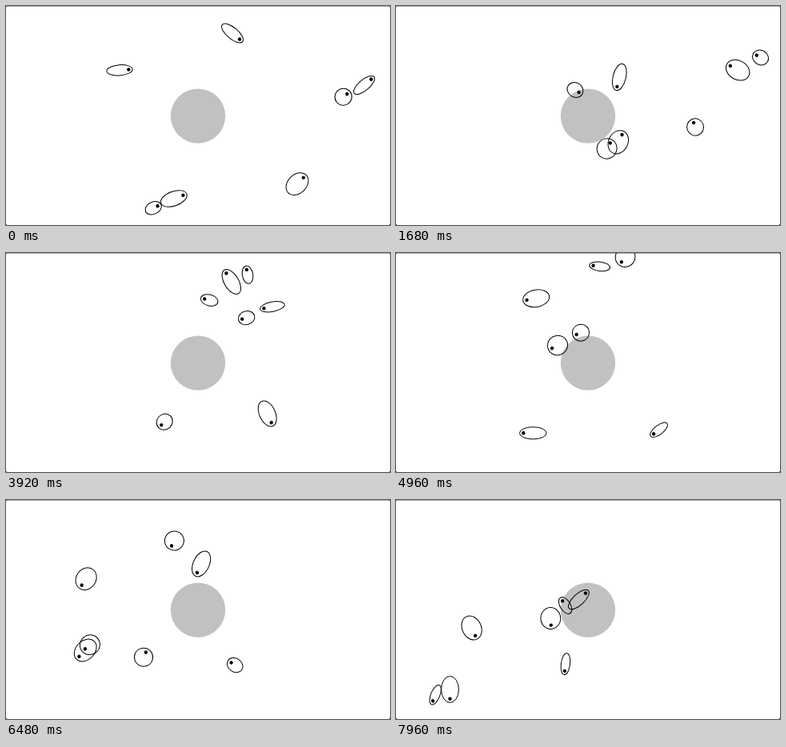
Recreate the animation shown at these times as an HTML page. Size 480 px wide and 274 px high, loop 8 s.

```html
<!DOCTYPE html>
<html lang="en">
<head>
<meta charset="utf-8">
<title>Swimmers</title>
<style>
  html, body { margin: 0; width: 100%; height: 100%; overflow: hidden; background: #fff; }
  svg { display: block; width: 100%; height: 100%; }
</style>
</head>
<body>
<svg id="stage" viewBox="0 0 480 274">
  <path d="M0 .5H480" stroke="#a8a8a8"/>
  <path d="M0 0h1v1h-1zM479 0h1v1h-1zM0 273h1v1h-1zM479 273h1v1h-1z" fill="#444"/>
  <circle cx="240" cy="137.6" r="34.2" fill="#c1c1c1"/>
</svg>
<script>
const LOOP = 8000, STEP = 40;
const TIMES = [0, 1.68, 2.48, 3.92, 4.96, 6.48, 7.96];
const BEAT = 6.2; // degrees of body pulse per pixel swum
const RAD = Math.PI / 180;
const stage = document.getElementById('stage');
const swimmers = [];

function add(parent, tag, attrs) {
  const el = document.createElementNS('http://www.w3.org/2000/svg', tag);
  for (const name in attrs) el.setAttribute(name, attrs[name]);
  return parent.appendChild(el);
}

function hermite(a, b, da, db, u) {
  const v = u * u, w = v * u;
  return a + (b - a) * (3 * v - 2 * w) + da * (w - 2 * v + u) + db * (w - v);
}

function slope(a, b, da, db, u) {
  return (b - a) * 6 * u * (1 - u) + da * (3 * u * u - 4 * u + 1) + db * (3 * u * u - 2 * u);
}

// Each waypoint: x, y, heading, pulse phase (degrees)
function swimmer(...points) {
  const keys = points.map(([x, y, heading, phase]) => ({ x, y, heading, phase }));
  const pace = [];
  for (let i = 1; i < keys.length; i++) {
    const a = keys[i - 1], b = keys[i];
    const dist = Math.hypot(b.x - a.x, b.y - a.y);
    pace.push(dist / (TIMES[i] - TIMES[i - 1]));
    const turn = ((b.phase - a.phase) % 360 + 360) % 360;
    const laps = Math.max(0, Math.round((dist * BEAT - turn) / 360));
    b.phase = a.phase + turn + 360 * laps;
  }
  keys.forEach((k, i) => {
    const last = pace.length - 1;
    k.speed = i === 0 ? pace[0] * 0.85 : i > last ? pace[last] : (pace[i - 1] + pace[i]) / 2;
    k.vx = k.speed * Math.cos(k.heading * RAD);
    k.vy = k.speed * Math.sin(k.heading * RAD);
  });
  const group = add(stage, 'g', {});
  const body = add(group, 'ellipse', { fill: 'none', stroke: '#000' });
  const eye = add(group, 'circle', { r: 2.2 });
  swimmers.push({ keys, group, body, eye });
}

swimmer([283, 34, 40, -35], [279.3, 89, 104, -15], [258.8, 140.7, 120, -38], [198.2, 211.3, 135, 170],
  [171.3, 225.3, 180, -25], [172, 196.7, -65, 131], [228.4, 124.5, -43, -38]);
swimmer([142, 80.3, -4, -45], [224, 105, 33, 180], [276.6, 141, 41, 165], [326.7, 201, 66, 17],
  [328.6, 221.3, 142, -103], [286.2, 206.6, -146, 189], [211.6, 132, -122, 229]);
swimmer([421.7, 113.7, -38, 155], [427.2, 80.2, -150, 58], [399, 72.9, -172, -120], [300.6, 81.2, 165, 190],
  [202, 115.5, 152, 109], [99.2, 188, 135, 52], [49.2, 243.8, 112, -103]);
swimmer([447.7, 99, -40, -45], [455.6, 64.5, -149, 180], [428.6, 57.8, -173, -9], [332.9, 67.3, 169, -59],
  [231, 99.7, 156, 155], [104.9, 181.2, 140, 109], [67.5, 237, 90, 35]);
swimmer([364, 222.6, -45, 52], [374.1, 151.5, -110, 155], [347.9, 111.7, -135, -10], [254.2, 59, -165, 217],
  [175.2, 56.8, 170, 31], [100.1, 98.6, 124, 77], [94.6, 160, 65, 58]);
swimmer([209.8, 241, -20, 0], [277.8, 170.3, -63, 65], [293.6, 117, -78, 0], [302, 27.2, -100, 222],
  [286.6, 5, 127, 109], [244.1, 79.9, 115, 17], [211.9, 205.2, 97, 266]);
swimmer([184.2, 252.8, -25, 205], [263.6, 178.4, -59, 105], [292.6, 115, -79, 30], [281.8, 36, -121, 0],
  [254.7, 16.8, -173, 257], [210.4, 51, 118, 120], [193.3, 148, 87, 95]);

function draw(ms) {
  const t = Math.floor((ms % LOOP) / STEP) * STEP / 1000;
  let i = 0;
  while (i < TIMES.length - 2 && t >= TIMES[i + 1]) i++;
  const span = TIMES[i + 1] - TIMES[i];
  const u = (t - TIMES[i]) / span;
  for (const { keys, group, body, eye } of swimmers) {
    const a = keys[i], b = keys[i + 1];
    const px = [a.x, b.x, a.vx * span, b.vx * span, u];
    const py = [a.y, b.y, a.vy * span, b.vy * span, u];
    const phase = RAD * hermite(a.phase, b.phase, a.speed * span * BEAT, b.speed * span * BEAT, u);
    const angle = Math.atan2(slope(...py), slope(...px)) / RAD;
    const rx = 13.75 + 3.4 * Math.cos(phase);
    group.setAttribute('transform', `translate(${hermite(...px)} ${hermite(...py)}) rotate(${angle})`);
    body.setAttribute('rx', rx);
    body.setAttribute('ry', 9 + 3.4 * Math.sin(phase));
    eye.setAttribute('cx', rx - 4.8);
  }
}

const start = performance.now();
function tick() {
  draw(performance.now() - start);
  requestAnimationFrame(tick);
}
tick();
</script>
</body>
</html>
```
